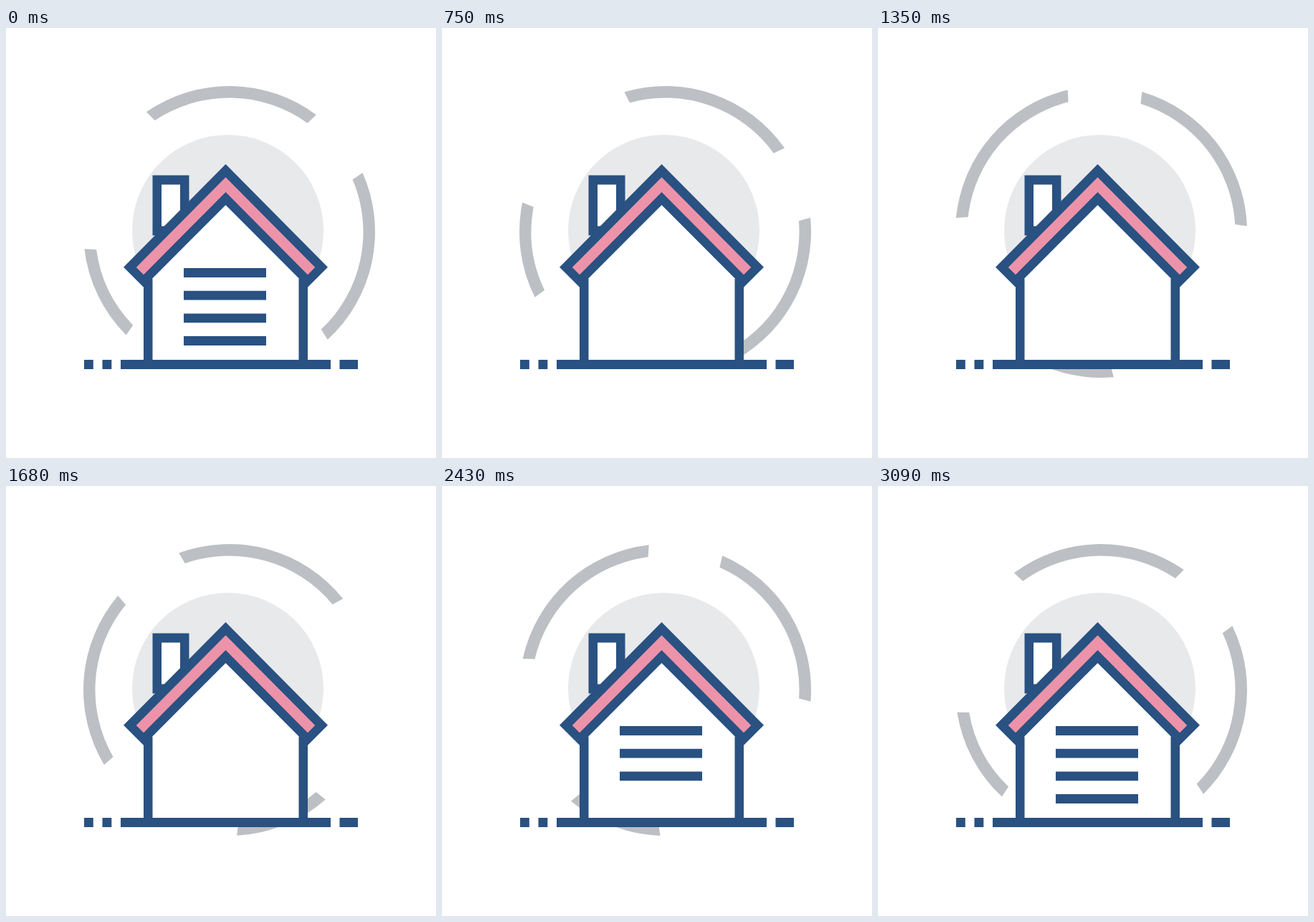
Recreate the animation shown at these times as an HTML page. Size 600 px wide and 600 px high, loop 3120 ms.

```html
<!DOCTYPE html>
<html lang="en">
<head>
<meta charset="utf-8">
<title>House</title>
<style>
  html, body { margin: 0; width: 100%; height: 100%; overflow: hidden; background: #fff; }
  svg { display: block; width: 100%; height: 100%; }
</style>
</head>
<body>
<svg viewBox="0 0 600 600">
  <defs>
    <clipPath id="door"><rect id="doorArea" x="240" y="330" width="130" height="113"/></clipPath>
  </defs>
  <circle cx="309.5" cy="282.5" r="133.5" fill="#e8e9eb"/>
  <path id="ring" fill="#bcbfc4"/>
  <path fill="#fff" d="M306.5 238L415 347V468H198V347ZM211 212H249V258L211 290Z"/>
  <g fill="#295181">
    <path d="M204.500 205.500H255.500V246L243 258.500V218.500H217V276.500H222L209 289.500H204.500Z"/>
    <path d="M192 350H204.500V466H192ZM408.500 350H421V466H408.500Z"/>
    <path d="M306.500 190L449 333.700L421 361.700L306.500 247L192 361.700L164 333.700Z"/>
    <path d="M109 463h12.800v13h-12.800ZM134.500 463h12.800v13h-12.800ZM160 463h293v13h-293ZM465.500 463h25.500v13h-25.500Z"/>
    <path id="slats" clip-path="url(#door)"/>
  </g>
  <path fill="#ed93a9" d="M306.500 208.300L431.300 334L421 344.300L306.500 229L192 344.300L181.700 334Z"/>
</svg>
<script>
const LOOP = 3120, STEP = 30;
const CENTER = { x: 311.5, y: 284.5 }, OUTER = 203.5, INNER = 187;
const ARCS = [[-34.6, 36.6], [66.1, 137.6], [225, 263.3]];

// [time in ms, value] pairs
const TURN = [[0, 0], [420, 24.7], [600, 36], [1020, -13.5], [1680, -86.3], [1710, -89],
  [2130, -24], [2160, -25.8], [2445, -44], [2730, -25.8], [3090, -2.1], [3120, 0]];
const DOOR = [[0, 443], [420, 370], [620, 335], [1960, 335], [2160, 371], [2570, 443], [3120, 443]];

const ring = document.getElementById('ring');
const doorArea = document.getElementById('doorArea');
document.getElementById('slats').setAttribute('d',
  [0, 1, 2, 3].map(i => `M248 ${335 + i * 31.7}h115v12.900h-115Z`).join(''));

function valueAt(keys, t) {
  const i = keys.findIndex(key => key[0] > t);
  const [t0, v0] = keys[i - 1], [t1, v1] = keys[i];
  return v0 + (v1 - v0) * (t - t0) / (t1 - t0);
}

// Angles run clockwise from the top.
function point(radius, degrees) {
  const a = degrees * Math.PI / 180;
  return `${(CENTER.x + radius * Math.sin(a)).toFixed(2)} ${(CENTER.y - radius * Math.cos(a)).toFixed(2)}`;
}

function arcPath(from, to) {
  const inset = 0.9;
  return `M${point(OUTER, from)}A${OUTER} ${OUTER} 0 0 1 ${point(OUTER, to)}` +
    `L${point(INNER, to - inset)}A${INNER} ${INNER} 0 0 0 ${point(INNER, from + inset)}Z`;
}

function draw(t) {
  const turn = valueAt(TURN, t);
  ring.setAttribute('d', ARCS.map(([a, b]) => arcPath(a + turn, b + turn)).join(''));
  doorArea.setAttribute('height', Math.max(0, valueAt(DOOR, t) - 330 - (valueAt(DOOR, t) <= 335 ? 5 : 0)));
}

let start;
function tick(now) {
  start ??= now;
  draw(Math.floor(((now - start) % LOOP) / STEP) * STEP);
  requestAnimationFrame(tick);
}
draw(0);
requestAnimationFrame(tick);
</script>
</body>
</html>
```
